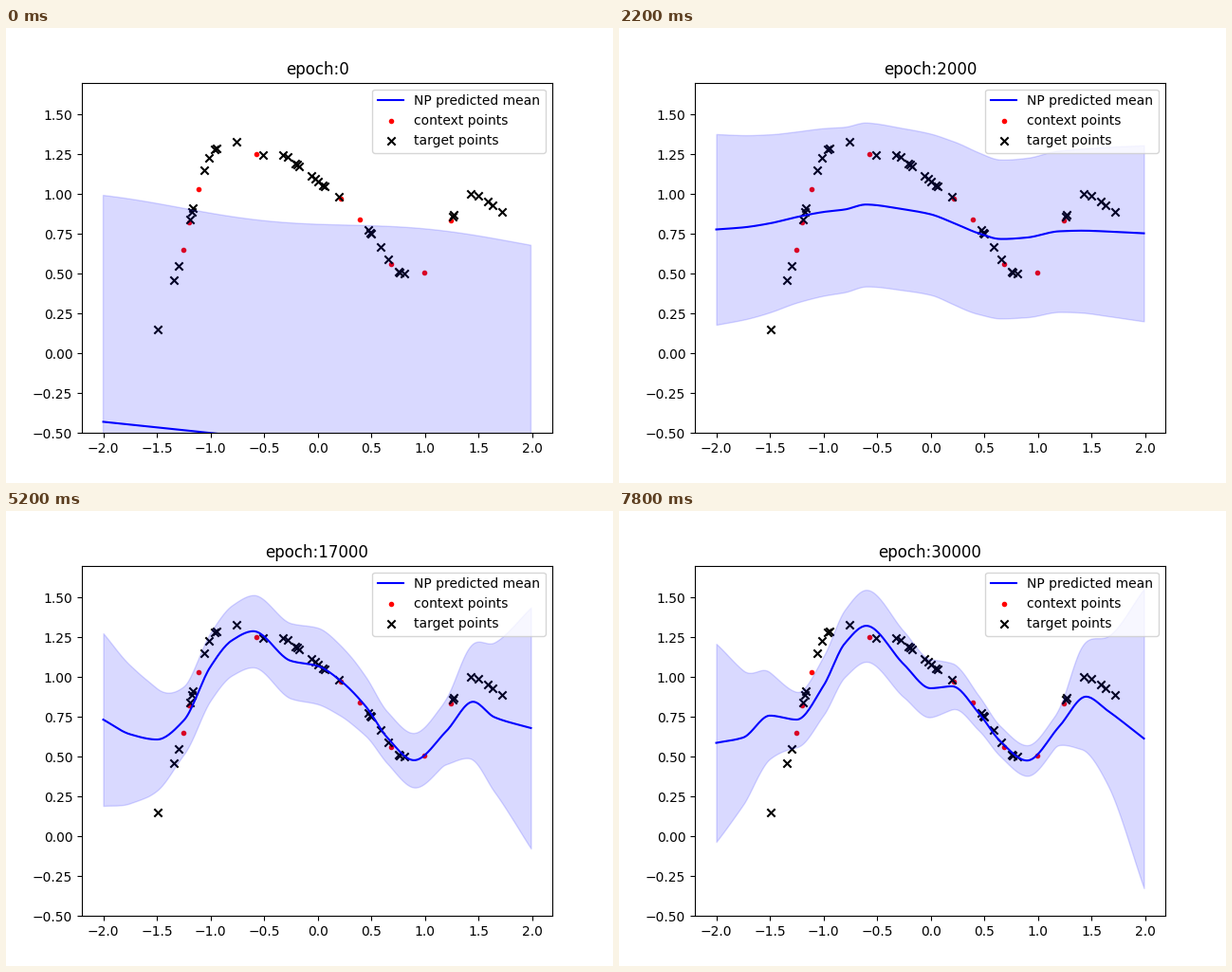
Write a matplotlib script that moves like this. It is 640 px wide and 480 px high and loops after 8000 ms.

```python
import numpy as np
import matplotlib.pyplot as plt
from matplotlib.animation import FuncAnimation

FRAMES, STEP_MS = 40, 200
GRID = np.linspace(-2, 1.99, 300)


def smooth(xk, yk, x=GRID):
    """Cubic through key points, flat at peaks and dips."""
    xk, yk = np.asarray(xk), np.asarray(yk)
    h = np.diff(xk)
    s = np.diff(yk) / h
    a, b = s[:-1], s[1:]
    same = a * b > 0
    inner = np.where(same, 2 * a * b / np.where(same, a + b, 1), 0)
    d = np.concatenate([s[:1], inner, s[-1:]])
    k = np.clip(np.searchsorted(xk, x) - 1, 0, len(h) - 1)
    t = (x - xk[k]) / h[k]
    return (yk[k] + t * t * (3 - 2 * t) * (yk[k + 1] - yk[k])
            + h[k] * t * (1 - t) * ((1 - t) * d[k] - t * d[k + 1]))


# The sampled function and where it is observed.
TRUTH = [(-1.49, .15), (-1.26, .64), (-1.17, .89), (-.95, 1.286),
         (-.755, 1.327), (-.55, 1.25), (-.32, 1.243), (-.18, 1.178),
         (0, 1.08), (.2, .98), (.5, .75), (.8, .5), (1, .505),
         (1.265, .862), (1.425, 1), (1.72, .888)]
context_x = np.array([-1.257, -1.197, -1.108, -.57, .215, .392, .682, .992,
                      1.24])
target_x = np.array([
    -1.49, -1.34, -1.3, -1.19, -1.17, -1.16, -1.055, -1.012, -.96, -.943,
    -.757, -.507, -.323, -.278, -.208, -.19, -.172, -.06, -.027, .007, .047,
    .063, .198, .471, .489, .502, .586, .656, .752, .762, .806, 1.26, 1.27,
    1.425, 1.495, 1.584, 1.628, 1.717])

# Prediction at a few steps: key heights of the mean and of its spread.
MEAN_X = [-2, -1.75, -1.5, -1.25, -1, -.8, -.6, -.25, 0, .2, .45, .65, .9,
          1.2, 1.45, 1.65, 1.99]
MEANS = {
    15: [.745, .773, .835, .932, 1.013, 1.055, 1.135, 1.072, 1.005, .89,
         .73, .652, .682, .785, .8, .792, .769],
    20: [.617, .585, .685, .802, 1.045, 1.124, 1.178, 1.06, 1.028, .99,
         .866, .718, .585, .702, .697, .703, .721],
    26: [.733, .641, .608, .727, 1.065, 1.23, 1.288, 1.102, 1.07, .985,
         .815, .62, .478, .66, .845, .748, .68],
    32: [.733, .728, .718, .655, .855, 1.16, 1.278, 1.11, .987, .985,
         .785, .605, .498, .69, .864, .757, .647],
    39: [.587, .62, .758, .733, .945, 1.212, 1.322, 1.08, .93, .942,
         .773, .597, .476, .69, .877, .79, .614]}
STD_X = [-2, -1.6, -1.2, -.6, 0, .3, .65, 1.15, 1.4, 1.65, 1.99]
STDS = {
    15: [.56, .475, .388, .335, .317, .338, .31, .34, .37, .42, .488],
    20: [.567, .412, .307, .29, .278, .245, .24, .3, .395, .505, .678],
    26: [.542, .37, .21, .227, .24, .21, .163, .193, .34, .47, .757],
    32: [.768, .47, .262, .29, .31, .28, .2, .243, .425, .63, 1.062],
    39: [.622, .325, .17, .226, .182, .128, .095, .1, .315, .465, .94]}

# Each stage holds two rows: mean and spread.
stages = {
    0: np.array([-.57 - .07 * GRID, 1.395 - .027 * np.cos(2 * GRID + 1)]),
    6: np.array([np.polyval([.0021, -.002, -.023, .78], GRID),
                 np.polyval([-.007, -.007, .64], GRID)])}
for step in MEANS:
    stages[step] = np.array([smooth(MEAN_X, MEANS[step]),
                             smooth(STD_X, STDS[step])])


def epoch(i):
    return 100 * i if i < 10 else 1000 * (i - 9)


def predict(i):
    """Mean and spread on the grid at step i."""
    steps = list(stages)
    a, b = next(p for p in zip(steps, steps[1:]) if i <= p[1])
    w = (i - a) / (b - a)
    if a == 0:    # the loss drops fast at first
        w = (1 - .2 ** i) / (1 - .2 ** b)
    elif a == 6:  # epochs are closely spaced here
        w **= 1.5
    return stages[a] + w * (stages[b] - stages[a])


fig, ax = plt.subplots(figsize=(6.4, 4.8), dpi=100)
line, = ax.plot(GRID, GRID, 'b', label='NP predicted mean')
for x, style, label in [(context_x, dict(c='r', marker='.'), 'context'),
                        (target_x, dict(c='k', marker='x'), 'target')]:
    ax.scatter(x, smooth(*zip(*TRUTH), x), s=36, label=f'{label} points',
               **style)
band = ax.fill_between(GRID, GRID, GRID, color='b', alpha=.15)
ax.set(xlim=(-2.1995, 2.1895), ylim=(-.5, 1.7))
ax.legend(loc='upper right')


def draw(i):
    mean, std = predict(i)
    line.set_ydata(mean)
    low = np.column_stack([GRID, mean - std])
    high = np.column_stack([GRID, mean + std])
    band.set_verts([np.vstack([low, high[::-1]])])
    ax.set_title(f'epoch:{epoch(i)}')
    return line, band


anim = FuncAnimation(fig, draw, frames=FRAMES, interval=STEP_MS,
                     repeat=True, repeat_delay=0)
plt.show()
```
